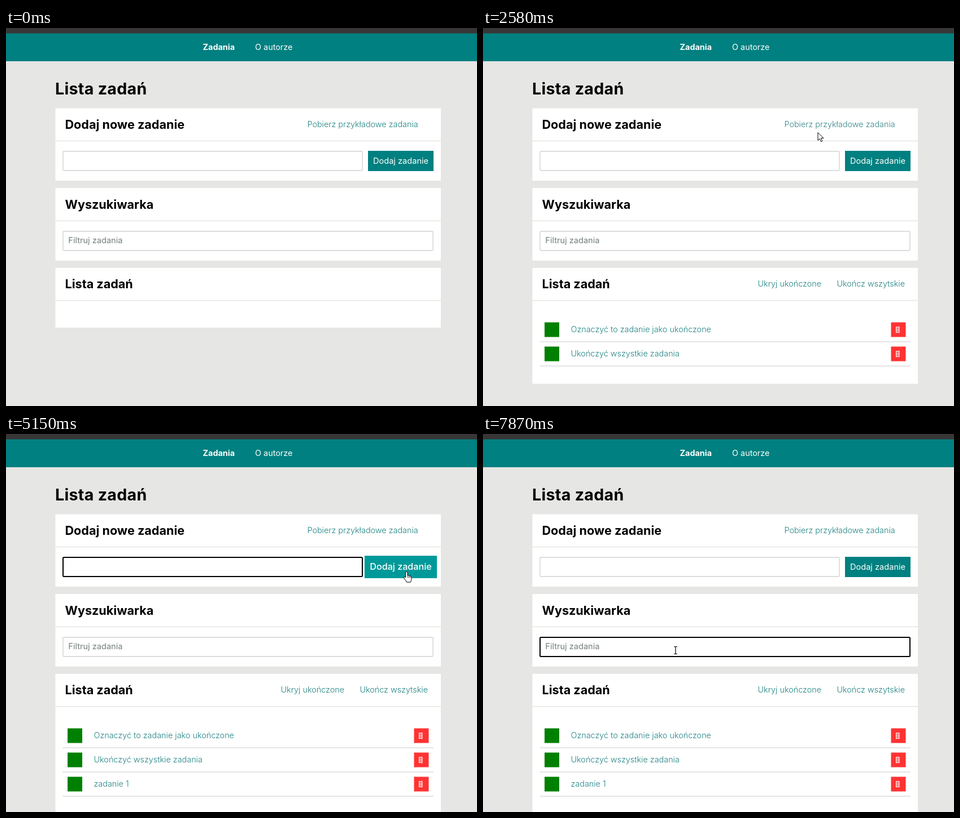
An HTML page for the animation above (8 s loop, 834 by 671 pixels).

```html
<!DOCTYPE html>
<html lang="pl">
<head>
<meta charset="utf-8">
<title>Lista zadań</title>
<style>
  html, body { margin: 0; width: 100%; height: 100%; overflow: hidden; background: #e6e6e4; }
  svg { display: block; width: 834px; height: 671px; }
  text { font: 14.4px Inter, "Open Sans", sans-serif; font-optical-sizing: none; white-space: pre; }
  .title { font-size: 28.6px; font-weight: 700; letter-spacing: .01em; }
  .heading { font-size: 21.6px; font-weight: 700; }
  .link { fill: #1f8282; font-weight: 350; }
  .bold { font-weight: 700; }
  .end { text-anchor: end; }
  .middle { text-anchor: middle; }
  .card { fill: #fff; }
  .rule { stroke: #e6e6e4; stroke-width: 1.4; }
  .field { fill: #fff; stroke: #ddd; stroke-width: 1.8; }
  .field.focus { stroke: #000; stroke-width: 2; }
  .caret { stroke: #000; stroke-width: 1; }
  .cursor { stroke: #000; fill: #fff; stroke-linejoin: round; stroke-linecap: round; }
</style>
</head>
<body>
<svg viewBox="0 0 834 671">
  <defs>
    <g id="bin" fill="none" stroke="#fff">
      <path d="M-3.2 -4.6H3.2" stroke-width="1.4"/>
      <path d="M-2.6 -4V4.8H2.6V-4" stroke-width="1.2"/>
      <path d="M-.9 -2.5V3M.9 -2.5V3" stroke-width=".8"/>
    </g>
  </defs>

  <rect width="834" height="671" fill="#e6e6e4"/>
  <rect width="834" height="10" fill="#383637"/>
  <rect y="9.5" width="834" height="49.5" fill="#008080"/>
  <g fill="#fff">
    <text class="bold" x="348.5" y="39">Zadania</text>
    <text x="441" y="39">O autorze</text>
  </g>
  <text class="title" x="87" y="118">Lista zadań</text>

  <rect class="card" x="87.5" y="142.5" width="682.5" height="128.5"/>
  <path class="rule" d="M87.5 200.5H770"/>
  <text class="heading" x="104.5" y="178.7">Dodaj nowe zadanie</text>
  <text class="link end" id="fetch" x="729.7" y="176"></text>
  <rect class="field" id="taskField" x="101" y="219" width="530" height="34" rx="1.5"/>
  <text id="taskText" x="113.5" y="240.5" fill="#222"></text>
  <path class="caret" id="taskCaret" d="M114.5 228.5V243.5"/>
  <g id="button">
    <rect id="buttonFace" x="-58" y="-18" width="116" height="36"/>
    <text class="middle" id="buttonText" y="4.6" fill="#fff" style="font-size:14.6px">Dodaj zadanie</text>
  </g>

  <rect class="card" x="87.5" y="284" width="682.5" height="128.8"/>
  <path class="rule" d="M87.5 342.2H770"/>
  <text class="heading" x="104.5" y="320.5">Wyszukiwarka</text>
  <rect class="field" id="filterField" x="101" y="361" width="655" height="34" rx="1.5"/>
  <text x="110.3" y="382" fill="#747d7d" style="font-size:14.6px">Filtruj zadania</text>
  <path class="caret" id="filterCaret" d="M111 370V385"/>

  <rect class="card" id="listCard" x="87.5" y="425.8" width="682.5"/>
  <path class="rule" d="M87.5 483.7H770"/>
  <text class="heading" x="104.5" y="462">Lista zadań</text>
  <g id="listLinks">
    <text class="link end" x="599" y="459">Ukryj ukończone</text>
    <text class="link end" x="747" y="459">Ukończ wszytskie</text>
  </g>
  <g id="rows"></g>

  <g class="cursor" id="cursor">
    <path id="arrow" d="M0 0V13.5L3.2 10.6L5.5 15.7L7.8 14.7L5.6 9.7H9.7Z"/>
    <g id="hand">
      <path d="M-1.4 9V1Q-1.2 -.7 .3 -.7T2 1V6Q3.2 5.2 4.4 6.3Q5.8 5.8 6.6 7Q8.6 6.6 8.9 8.6V12.5Q8.9 15 7.3 18H.3Q-1 14.5 -4.3 11Q-4.9 9 -3.2 8.8Z"/>
      <path d="M2 6V10M4.5 6.5V10M6.7 7.2V10" fill="none" stroke-width=".8"/>
    </g>
    <path id="beam" d="M-2.5 -6.5H-1Q0 -6.5 0 -5.5Q0 -6.5 1 -6.5H2.5M0 -5.5V5.5M-2.5 6.5H-1Q0 6.5 0 5.5Q0 6.5 1 6.5H2.5" fill="none" stroke-width="1.2"/>
  </g>
</svg>
<script>
const LOOP = 8000;
const LOAD_START = 1140, LOAD_END = 2300;
const TASK_FOCUS = 3200, TYPE_START = 3620, TYPE_STEP = 70;
const HOVER_START = 4780, TASK_ADDED = 5120, HOVER_END = 5750;
const FILTER_FOCUS = 7200;
const TASKS = ["Oznaczyć to zadanie jako ukończone", "Ukończyć wszystkie zadania", "zadanie 1"];

// Pointer path: [time, x, y]
const PATH = [
  [0, 806, 690], [120, 800, 657], [400, 742, 450], [650, 676, 275], [870, 627, 183],
  [930, 619, 175], [2450, 619, 175], [2750, 560, 200], [3000, 470, 231], [3210, 459, 236],
  [3360, 459, 236], [3410, 476, 238], [3900, 476, 238], [4150, 518, 271], [4390, 518, 271],
  [4600, 620, 256], [4780, 709, 245], [5150, 709, 245], [5220, 707, 244], [5290, 706, 243],
  [5620, 706, 243], [5690, 682, 320], [5760, 649, 403], [6000, 690, 510], [6300, 772, 668],
  [6370, 776, 690], [6400, 735, 690], [6460, 725, 639], [6700, 600, 520], [6950, 420, 415],
  [7130, 345, 385], [7340, 345, 385], [7480, 341, 384], [8000, 341, 384]
];

const $ = id => document.getElementById(id);
const clamp = v => Math.min(1, Math.max(0, v));
const show = (id, on) => $(id).setAttribute("visibility", on ? "visible" : "hidden");
const inside = ([x, y], x0, y0, x1, y1) => x >= x0 && x <= x1 && y >= y0 && y <= y1;
const mix = (a, b, k) => `rgb(${a.map((v, i) => Math.round(v + (b[i] - v) * k))})`;

// CSS "ease" timing: cubic-bezier(.25, .1, .25, 1)
function ease(x) {
  x = clamp(x);
  const bezier = (u, a, b) => 3 * u * (1 - u) ** 2 * a + 3 * u * u * (1 - u) * b + u ** 3;
  let low = 0, high = 1;
  for (let i = 0; i < 20; i++) {
    const mid = (low + high) / 2;
    if (bezier(mid, .25, .25) < x) low = mid; else high = mid;
  }
  return bezier(low, .1, 1);
}

function pointerAt(t) {
  const i = PATH.findIndex(p => p[0] > t);
  const [t0, x0, y0] = PATH[i - 1], [t1, x1, y1] = PATH[i];
  const k = (t - t0) / (t1 - t0);
  return [x0 + (x1 - x0) * k, y0 + (y1 - y0) * k];
}

function cursorKind(p, loading) {
  if (inside(p, 101, 218, 632, 254) || inside(p, 101, 360, 757, 406)) return "beam";
  if (inside(p, 641, 218, 757, 254)) return "hand";
  if (!loading && inside(p, 530, 160, 730, 182)) return "hand";
  return "arrow";
}

$("rows").innerHTML = TASKS.map((task, i) => `
  <g id="row${i}" transform="translate(0 ${i * 43})">
    <rect x="109" y="522.5" width="26" height="26" fill="#008000"/>
    <text class="link" x="155.5" y="540">${task}</text>
    <rect x="722.5" y="522.5" width="26" height="26" fill="#f33"/>
    <use href="#bin" x="734.3" y="535.5"/>
    <path d="M100.5 557H757" stroke="#ddd" stroke-width="1.7"/>
  </g>`).join("");

function drawLink(t, loading, pointer) {
  const teal = [31, 130, 130], grey = [145, 145, 145], bright = [0, 153, 153];
  const link = $("fetch");
  const hovered = inside(pointer, 530, 160, 730, 182);
  link.textContent = loading ? "Ładowanie..." : "Pobierz przykładowe zadania";
  link.style.fill =
    loading ? mix(bright, grey, ease((t - LOAD_START) / 550)) :
    t >= LOAD_END ? mix(grey, hovered ? bright : teal, ease((t - LOAD_END) / 550)) :
    mix(teal, bright, hovered ? 1 : 0);
}

function drawButton(t) {
  const hovered = t >= HOVER_START && t < HOVER_END;
  const grow = hovered ? ease((t - HOVER_START - 20) / 340)
    : t >= HOVER_END ? 1 - ease((t - HOVER_END) / 1000) : 0;
  $("button").setAttribute("transform", `translate(699 236) scale(${1 + grow * .105})`);
  $("buttonFace").setAttribute("fill", hovered ? "#009999" : "#008080");
  $("buttonText").style.fontWeight = hovered ? 500 : 400;
}

function drawFields(t) {
  const taskFocus = t >= TASK_FOCUS && t < FILTER_FOCUS;
  const filterFocus = t >= FILTER_FOCUS;
  const typed = t < TYPE_START || t >= TASK_ADDED ? 0 : Math.floor((t - TYPE_START) / TYPE_STEP) + 1;
  $("taskField").classList.toggle("focus", taskFocus);
  $("filterField").classList.toggle("focus", filterFocus);
  $("taskText").textContent = TASKS[2].slice(0, typed);
  show("taskCaret", taskFocus && !typed && (t < TYPE_START ? t >= 3540 : t >= 6300 && t < 6830));
  show("filterCaret", filterFocus && t >= 7340 && t < 7870);
}

function drawList(t) {
  const count = t < LOAD_END ? 0 : t < TASK_ADDED ? 2 : 3;
  $("listCard").setAttribute("height", count ? 119.8 + 43 * count : 106);
  show("listLinks", count);
  TASKS.forEach((_, i) => show("row" + i, i < count));
}

function draw(t) {
  const pointer = pointerAt(t);
  const loading = t >= LOAD_START && t < LOAD_END;
  drawLink(t, loading, pointer);
  drawButton(t);
  drawFields(t);
  drawList(t);
  const kind = cursorKind(pointer, loading);
  ["arrow", "hand", "beam"].forEach(id => show(id, id === kind));
  $("cursor").setAttribute("transform", `translate(${pointer.map(Math.round)})`);
}

const start = performance.now();
function frame() {
  draw((performance.now() - start) % LOOP);
  requestAnimationFrame(frame);
}
frame();
</script>
</body>
</html>
```
